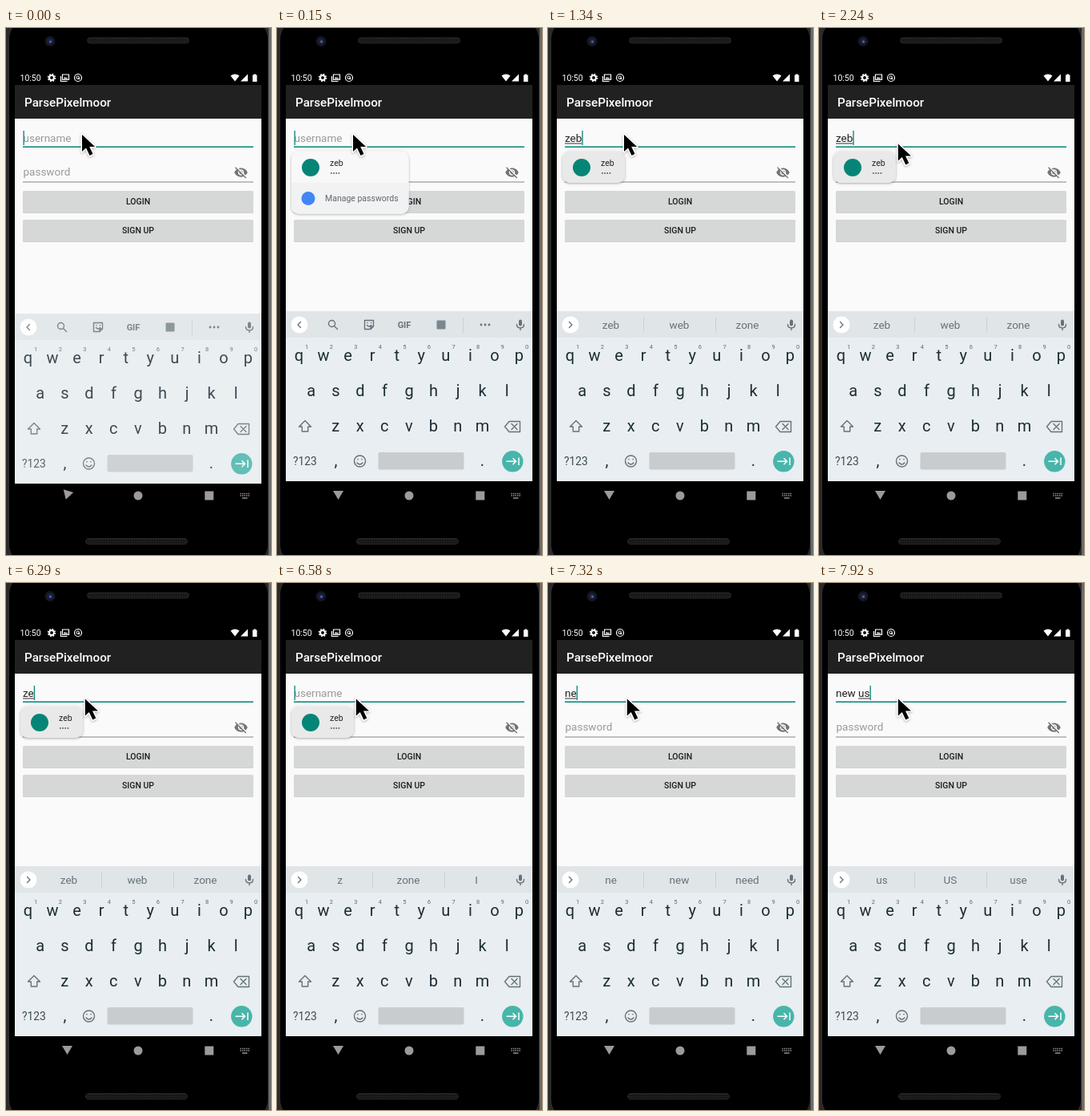
Recreate the animation shown at these times as an HTML page. Size 331 by 657 pixels, loop 8 s.

```html
<!DOCTYPE html>
<html lang="en">
<head>
<meta charset="utf-8">
<title>Login form</title>
<style>
html, body { margin: 0; width: 100%; height: 100%; overflow: hidden; background: #000; }
svg { display: block; width: 331px; height: 657px; font-family: Roboto, sans-serif; }
.mid { text-anchor: middle; }
.field { font-size: 13.5px; fill: #222; }
.hint { font-size: 13.5px; fill: #9a9a9a; }
.button { font-size: 10.5px; font-weight: 500; fill: #1c1c1c; }
.key { font-size: 20px; fill: #1c2d36; }
.digit { font-size: 7.5px; fill: #5c6a72; }
.word { font-size: 13.5px; fill: #66737a; }
.line { fill: none; stroke: #65727a; stroke-width: 1.4; stroke-linejoin: round; stroke-linecap: round; }
</style>
</head>
<body>
<svg viewBox="0 0 331 657">
  <defs>
    <pattern id="mesh" width="3" height="3" patternUnits="userSpaceOnUse">
      <rect width="3" height="3" fill="#161616"/><circle cx="1.5" cy="1.5" r=".8" fill="#2b2b2b"/>
    </pattern>
    <filter id="shadow" x="-20%" y="-20%" width="140%" height="150%">
      <feDropShadow dx="0" dy="1" stdDeviation="1.5" flood-opacity=".32"/>
    </filter>
  </defs>

  <!-- phone body -->
  <rect width="331" height="657" fill="#2a2a2a"/>
  <rect x="328" width="3" height="657" fill="#6a6a6a"/>
  <rect x="3.5" y="-12" width="324" height="682" rx="26" fill="#000" stroke="#303030"/>
  <rect x="101.5" y="12" width="127" height="7" rx="3.5" fill="url(#mesh)" stroke="#262626"/>
  <rect x="99.5" y="636.5" width="127" height="7" rx="3.5" fill="url(#mesh)" stroke="#262626"/>
  <circle cx="55" cy="16.5" r="6.5" fill="#15161c"/>
  <circle cx="55" cy="16.5" r="3.8" fill="#1a2145"/>
  <circle cx="55.5" cy="17" r="1.5" fill="#5668a8"/>
  <rect x="11" y="48" width="308" height="552" fill="#000"/>

  <!-- status bar -->
  <g fill="#fff">
    <text x="17.5" y="66" font-size="10.5">10:50</text>
    <circle cx="57" cy="62" r="2.9" fill="none" stroke="#fff" stroke-width="2"/>
    <circle cx="57" cy="62" r="4.5" fill="none" stroke="#fff" stroke-width="1.4" stroke-dasharray="1.8 1.734"/>
    <path d="M70.5 58h8v6.5h-8zM68.5 60v6.5h8" fill="none" stroke="#fff" stroke-width="1.2"/>
    <path d="M71.5 63.5l2-2.5 1.5 1.5 1-1 1.5 2z"/>
    <circle cx="90" cy="62" r="4.5" fill="none" stroke="#fff" stroke-width="1.2"/>
    <path d="M90 62l2 2" stroke="#fff" stroke-width="1.3"/>
    <circle cx="89.7" cy="61.7" r="1.8" fill="none" stroke="#fff"/>
    <path d="M280.5 59.500q5.500-4.200 11 0l-5.500 7z"/>
    <path d="M302 57.500v9h-9z"/>
    <path d="M308 58.500h1.500v-1h2.500v1h1.500v8.500h-5.500z"/>
  </g>

  <!-- app -->
  <rect x="11" y="71" width="308" height="42" fill="#212121"/>
  <text x="23" y="98" font-size="15.2" font-weight="500" fill="#fff">ParsePixelmoor</text>
  <rect x="11" y="113" width="308" height="243" fill="#fafafa"/>
  <text id="hint" class="hint" x="21.5" y="142">username</text>
  <text class="field" x="21" y="142"><tspan id="done"></tspan><tspan id="typed"></tspan></text>
  <rect id="compose" y="143.5" height="1" fill="#333"/>
  <rect id="caret" y="128" width="1.3" height="18" fill="#008577"/>
  <rect x="21" y="147.5" width="288" height="1.5" fill="#008577"/>
  <text class="hint" x="21.5" y="184">password</text>
  <rect x="21" y="191.5" width="288" height="1" fill="#858585"/>
  <path transform="translate(284.5 171) scale(.75)" fill="#737373" d="M12 7c2.760 0 5 2.240 5 5 0 .65-.13 1.26-.36 1.83l2.92 2.92c1.510-1.260 2.700-2.890 3.430-4.750-1.730-4.390-6-7.500-11-7.500-1.400 0-2.740.25-3.980.7l2.160 2.160C10.740 7.130 11.350 7 12 7zM2 4.270l2.740 2.740C3.080 8.300 1.780 10.020 1 12c1.730 4.390 6 7.500 11 7.500 1.550 0 3.030-.3 4.380-.84L19.730 22 21 20.730 3.270 3zM7.530 9.800l1.550 1.550c-.05.21-.08.43-.08.65 0 1.660 1.340 3 3 3 .22 0 .44-.03.65-.08l1.550 1.550c-.67.33-1.410.53-2.200.53-2.760 0-5-2.240-5-5 0-.79.2-1.530.53-2.200zm4.310-.78l3.150 3.150.02-.16c0-1.660-1.340-3-3-3z"/>
  <g id="buttons"></g>

  <!-- keyboard -->
  <g id="keyboard">
    <rect x="11" y="353" width="308" height="212" fill="#fafafa"/>
    <g id="face">
      <rect x="11" y="353" width="308" height="212" fill="#e8eef1"/>
      <rect x="11" y="353" width="308" height="33" fill="#e0e5e8"/>
      <circle cx="28" cy="370" r="11" fill="#fff" stroke="#d3d8da" stroke-width=".6"/>
      <path id="chevron" class="line"/>
      <g id="tools">
        <circle class="line" cx="68.5" cy="368.5" r="4"/>
        <path class="line" d="M71.5 371.5l4 4"/>
        <path class="line" d="M109.500 364.500h11v7.500l-3.500 3.500h-7.500zM120.500 372h-3.500v3.500M112.500 370.500q2.500 3 5 0M113 367.500v.3M117.500 367.500v.3"/>
        <text class="mid" x="159" y="374" font-size="11" font-weight="700" fill="#65727a">GIF</text>
        <rect x="199.5" y="364.5" width="11" height="11" rx="1" fill="#7b878d"/>
        <path d="M232.5 361v19" stroke="#cbd1d4"/>
        <g fill="#65727a"><circle cx="255" cy="370" r="1.4"/><circle cx="260" cy="370" r="1.4"/><circle cx="265" cy="370" r="1.4"/></g>
      </g>
      <g id="suggest">
        <path d="M119.5 360.5v19M209.5 360.5v19" stroke="#cbd1d4"/>
        <text class="word mid" x="78.5" y="375"></text>
        <text class="word mid" x="164" y="375"></text>
        <text class="word mid" x="249" y="375"></text>
      </g>
      <rect x="302" y="363.5" width="4" height="8" rx="2" fill="#65727a"/>
      <path class="line" d="M299.5 369.5q0 4.500 4.500 4.500t4.500-4.500M304 374v2.500"/>
      <g id="keys"></g>
      <path class="line" d="M35 489.500l7.500 7.500h-3.800v6h-7.400v-6h-3.800z"/>
      <path class="line" d="M290 490.500h13.500v13h-13.500l-5.500-6.500zM293 493.500l7 7M300 493.500l-7 7"/>
      <text class="mid" x="35" y="545" font-size="13.8" fill="#3b4c55">?123</text>
      <text class="key mid" x="73.5" y="546">,</text>
      <circle class="line" cx="103.5" cy="540" r="7"/>
      <path class="line" d="M100 542q3.500 4 7 0M101 537.500v.4M106 537.500v.4"/>
      <rect x="126.5" y="529" width="107" height="21.5" rx="2" fill="#c8ccce"/>
      <text class="key mid" x="256.5" y="546">.</text>
      <circle cx="294.3" cy="540.3" r="13.2" fill="#48b5aa"/>
      <path d="M286.500 540.300h12M294.500 536.300l4 4-4 4M302 535.500v9.500" fill="none" stroke="#fff" stroke-width="1.5"/>
    </g>
  </g>

  <!-- navigation bar -->
  <g fill="#9b9b9b">
    <path id="back" d="M70 577h13l-6.500 11z"/>
    <circle cx="165" cy="583" r="5.500"/>
    <rect x="248.300" y="577.500" width="11" height="11"/>
    <path d="M292.500 580.500h11.500M292.500 583h11.500" stroke="#9b9b9b" stroke-width="1.400" stroke-dasharray="1.400 1.100"/>
    <path d="M295 586h6.500" stroke="#9b9b9b" stroke-width="1.400"/>
  </g>

  <!-- saved login popup -->
  <g id="popup">
    <rect id="card" x="18" y="153.5" rx="9" filter="url(#shadow)"/>
    <g id="manage">
      <path d="M18 193h146.500v29.500a9 9 0 0 1-9 9h-128.500a9 9 0 0 1-9-9z" fill="#f0f2f3"/>
      <circle cx="39" cy="212.5" r="8.5" fill="#4285f4"/>
      <text x="60" y="216.3" font-size="10.5" fill="#666">Manage passwords</text>
    </g>
    <g id="account">
      <circle cx="42" cy="174" r="11" fill="#068577"/>
      <text x="66" y="171.5" font-size="10.5" fill="#222">zeb</text>
      <path d="M67 181h12" stroke="#444" stroke-width="1.5" stroke-dasharray="1.6 1.6"/>
    </g>
  </g>

  <path id="mouse" d="M0 0v21l5-4.500 4.500 9.500 4-2-4.300-9h7z" stroke="#fff" stroke-width="2.800" stroke-linejoin="round" paint-order="stroke" filter="url(#shadow)"/>
</svg>
<script>
const $ = id => document.getElementById(id);
const LOOP = 8000;

// [start ms, finished text, word being typed, popup, suggestions]
const steps = [
  [0, "", "", "none", ""],
  [150, "", "", "full", ""],
  [750, "", "z", "fresh", "z zone I"],
  [1040, "", "ze", "small", "ze zero zenith"],
  [1340, "", "zeb", "small", "zeb web zone"],
  [6290, "", "ze", "small", "zeb web zone"],
  [6430, "", "z", "small", "ze zero zenith"],
  [6580, "", "", "small", "z zone I"],
  [6730, "", "", "full", ""],
  [7180, "", "n", "blank", ""],
  [7320, "", "ne", "none", "ne new need"],
  [7470, "", "new", "none", "new now news"],
  [7770, "new\u00a0", "", "none", "phone year one"],
  [7920, "new\u00a0", "us", "none", "us US use"]
];
const mouse = [[0, 95, 133], [2090, 96, 135], [2240, 98.8, 144.5]];
const cardFill = { full: "#f8f8f8", blank: "#fcfcfc", fresh: "#f3f3f3", small: "#e9e9e9" };

const at = (list, t) => list.findLast(item => item[0] <= t);
const show = (id, on) => $(id).setAttribute("visibility", on ? "inherit" : "hidden");
const set = (id, attrs) => Object.entries(attrs).forEach(([k, v]) => $(id).setAttribute(k, v));
const label = (cls, x, y, s) => `<text class="${cls} mid" x="${x}" y="${y}">${s}</text>`;

$("buttons").innerHTML = ["LOGIN", "SIGN UP"].map((s, i) => {
  const y = 203 + 36 * i;
  return `<rect x="21" y="${y + 0.8}" width="288" height="27.2" rx="1.5" fill="#d0d1d1"/>
    <rect x="21" y="${y}" width="288" height="27" rx="1.5" fill="#d6d7d7"/>` +
    label("button", 165, y + 17.2, s);
}).join("");

$("keys").innerHTML = ["qwertyuiop", "asdfghjkl", "zxcvbnm"].map((row, r) =>
  [...row].map((c, i) => {
    const x = [27.5, 42.8, 73.1][r] + 30.55 * i;
    return label("key", x, 415 + 44 * r, c) +
      (r ? "" : label("digit", x + 9.7, 400, (i + 1) % 10));
  }).join("")).join("");

function drawField(done, word) {
  $("done").textContent = done;
  $("typed").textContent = word;
  const start = 21 + (done ? $("done").getComputedTextLength() : 0);
  const width = word ? $("typed").getComputedTextLength() : 0;
  set("compose", { x: start, width });
  set("caret", { x: start + width + (done || word ? 0 : 0.5) });
  show("hint", !done && !word);
}

function drawPopup(mode) {
  const big = mode === "full" || mode === "blank";
  show("popup", mode !== "none");
  show("manage", mode === "full");
  show("account", mode !== "blank" && mode !== "none");
  set("card", {
    width: big ? 146.5 : mode === "fresh" ? 77 : 78,
    height: big ? 78 : 39.5,
    fill: cardFill[mode] || "none"
  });
}

function drawKeyboard(words, opening) {
  set("keyboard", { transform: `translate(0 ${opening ? 3 : 0})` });
  set("face", { opacity: opening ? 0.85 : 1 });
  set("back", { transform: `rotate(${opening ? 17 : 0} 76.5 582)` });
  set("chevron", { d: words ? "M26.5 366.5l3.5 3.5-3.5 3.5" : "M29.5 366.5l-3.5 3.5 3.5 3.5" });
  show("tools", !words);
  show("suggest", words);
  const list = words.split(" ");
  document.querySelectorAll("#suggest text").forEach((el, i) => el.textContent = list[i] || "");
}

const origin = performance.now();
function frame() {
  const t = (performance.now() - origin) % LOOP;
  const [start, done, word, popup, words] = at(steps, t);
  const [, x, y] = at(mouse, t);
  drawField(done, word);
  drawPopup(popup);
  drawKeyboard(words, start === 0);
  set("mouse", { transform: `translate(${x} ${y})` });
  requestAnimationFrame(frame);
}
frame();
</script>
</body>
</html>
```
